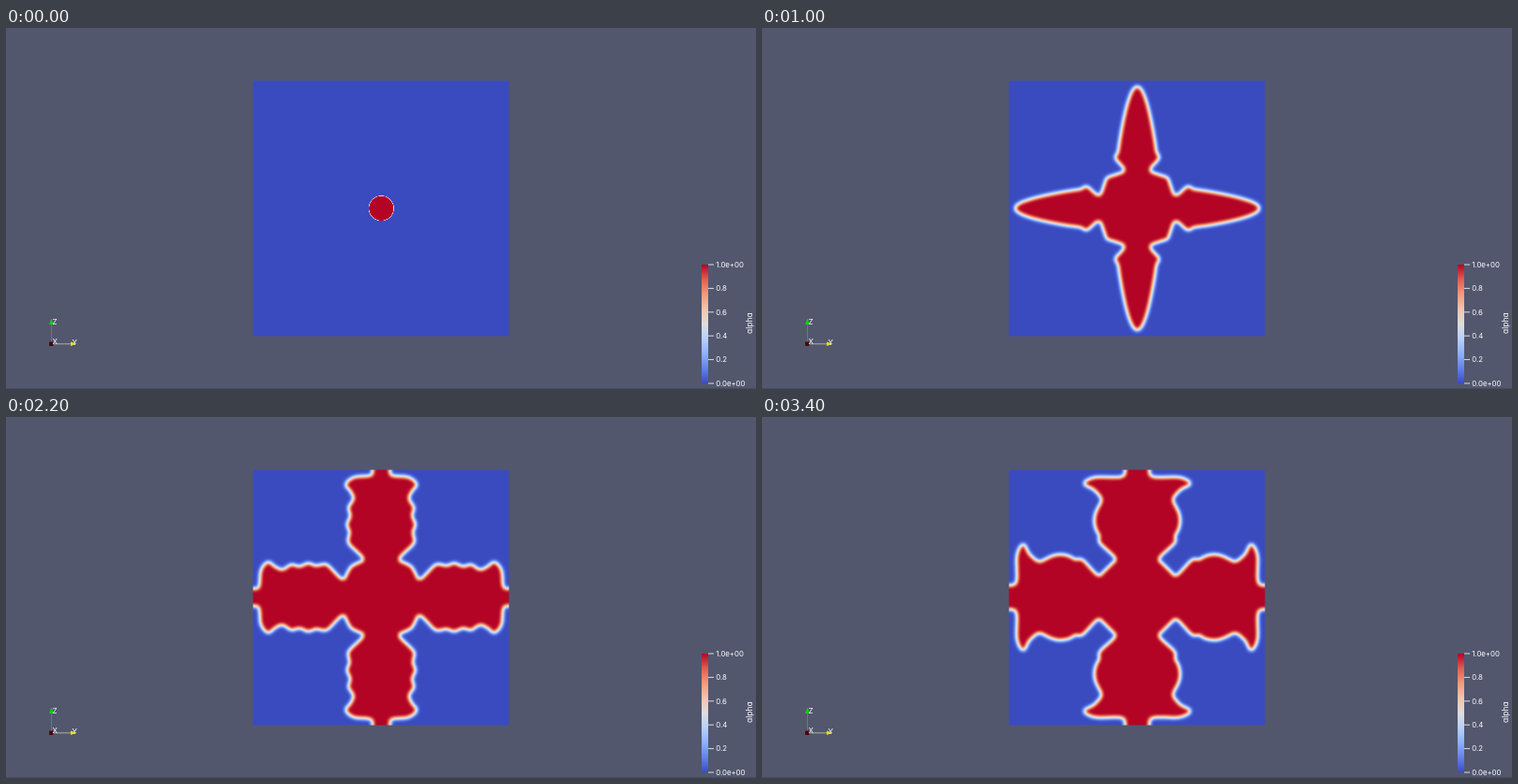
Recreate the animation shown at these times as an HTML page. Size 800 px wide and 386 px high, loop 3.6 s.

```html
<!DOCTYPE html>
<html lang="en">
<head>
<meta charset="utf-8">
<title>Crystal growth</title>
<style>
  html, body { margin: 0; width: 100%; height: 100%; overflow: hidden; background: #52576e; }
  svg { display: block; width: 100%; height: 100%; }
  text { font-family: Inter, "Open Sans", sans-serif; font-size: 8px; fill: #fff; font-feature-settings: "cv11"; }
</style>
</head>
<body>
<svg viewBox="0 0 800 386">
  <defs>
    <clipPath id="box"><rect x="263.5" y="56.5" width="273" height="273"/></clipPath>
    <linearGradient id="ramp" x1="0" y1="1" x2="0" y2="0"></linearGradient>
    <filter id="cool" filterUnits="userSpaceOnUse" x="250" y="43" width="300" height="300" color-interpolation-filters="sRGB">
      <feGaussianBlur id="blur" stdDeviation="2"/>
      <feComponentTransfer id="map"></feComponentTransfer>
    </filter>
  </defs>
  <rect width="800" height="386" fill="#52576e"/>
  <rect y="385" width="800" height="1" fill="#484c61"/>

  <g clip-path="url(#box)">
    <g filter="url(#cool)">
      <rect x="240" y="33" width="320" height="320" fill="#000"/>
      <path id="crystal" fill="#fff"/>
    </g>
  </g>

  <g id="axes">
    <path d="M48.5 337V317" stroke="#1fae2c"/>
    <path d="M49 337.8H70" stroke="#a9b58c"/>
    <path d="M48.5 310.5L51 317H46Z" fill="#10d010"/>
    <path d="M75.5 337.8L69 335.5V340Z" fill="#e8e010"/>
    <rect x="46" y="335.5" width="4.5" height="4.5" rx="1" fill="#4a0508"/>
    <text x="49.4" y="316.5">Z</text>
    <text x="49.6" y="338">X</text>
    <text x="70.4" y="338.5">Y</text>
  </g>

  <g id="legend">
    <rect x="742" y="253" width="7" height="127" fill="url(#ramp)"/>
    <text transform="translate(796 327) rotate(-90)" style="font-size:8.5px">alpha</text>
  </g>
</svg>
<script>
const NS = "http://www.w3.org/2000/svg";
const $ = id => document.getElementById(id);
function add(parent, tag, attrs, text) {
  const el = document.createElementNS(NS, tag);
  for (const k in attrs) el.setAttribute(k, attrs[k]);
  if (text) el.textContent = text;
  parent.appendChild(el);
}

// Cool to warm colour map, shared by the field and the legend.
const MAP = ["#3b4cc0", "#6282ea", "#8db0fe", "#b8d0f9", "#dddddd", "#f5c4ad", "#f49a7b", "#de604d", "#b40426"];
MAP.forEach((c, i) => add($("ramp"), "stop", { offset: i / 8, "stop-color": c }));
["R", "G", "B"].forEach((ch, i) => add($("map"), "feFunc" + ch, {
  type: "table",
  tableValues: MAP.map(c => (parseInt(c.substr(1 + 2 * i, 2), 16) / 255).toFixed(3)).join(" ")
}));

for (let i = 0; i <= 5; i++) {
  const y = 380 - i * 25.4;
  add($("legend"), "path", { d: `M749 ${y}H755`, stroke: "#fff", "stroke-width": 0.8 });
  const label = i % 5 ? (i / 5).toFixed(1) : i / 5 + ".0e+00";
  add($("legend"), "text", { x: 757.2, y: y + 2.8, style: "font-size:7.8px" }, label);
}

const STEP = 200, LOOP = 3600, CX = 400.3, CY = 192.8;
const BUD = 400, STAR = 1000, WALL = 1400, END = 3400;
const lerp = (a, b, k) => a + (b - a) * k;
const range = (n, f) => Array.from({ length: n }, (_, i) => f(i));

// Each outline is one eighth of the crystal: [half width, height] from arm tip to diagonal.
function seed() {
  return range(19, i => {
    const a = i / 18 * Math.PI / 4;
    return [13.3 * Math.sin(a), 13.3 * Math.cos(a)];
  });
}

// Free growth: a parabolic arm whose tip advances at constant speed.
function star(t) {
  const k = Math.max(0, (t - BUD) / (STAR - BUD));
  const size = 0.55 + 0.45 * Math.min(1, t / BUD);
  const at = (w0, h0, w1, h1) => [lerp(w0, w1, k) * size, lerp(h0, h1, k) * size];
  const tip = 13.3 + 0.1172 * t;
  const flank = at(9.2, 39, 20.8, 60);
  return [
    ...range(15, i => [flank[0] * i / 14, lerp(tip, flank[1], (i / 14) ** 2)]),
    at(9.6, 36.5, 23.5, 53.5),
    at(11, 33.5, 14, 41),
    at(17, 28.5, 25, 35.5),
    at(24, 24, 32.6, 32.6)
  ];
}

// After the arms meet the wall: they thicken, ripple and grow horns at the ends.
function cross(t) {
  const s = Math.max(0, (t - WALL) / (END - WALL)), u = s ** 0.78;
  const at = (w0, h0, w1, h1) => [lerp(w0, w1, u), lerp(h0, h1, u)];
  const side = h => lerp(24.5, 46, u) - 0.12 * (h - 83) * (1 - u) - 0.02 * (h - 82) ** 2 * s ** 2
    + 1.6 * Math.sin(Math.PI * s) * Math.cos((h - 78) / 18 * 2 * Math.PI);
  return [
    at(6, 150, 13, 150),
    at(6, 137, 13, 137),
    at(6.5, 132, 17, 129),
    at(14, 128.5, 45, 128.5),
    at(20, 120, 57, 121.5),
    at(20.5, 112, 46, 114.5),
    at(21.5, 106, 38.5, 105),
    ...range(8, i => { const h = 97 - 4.5 * i; return [side(h), h]; }),
    at(29.5, 56.5, 40, 58),
    at(15.5, 41, 24, 42.3),
    at(25, 36.5, 27, 36.5),
    at(33.5, 33.5, 31.7, 31.7)
  ];
}

function octant(t) {
  if (t === 0) return seed();
  if (t <= STAR) return star(t);
  const k = Math.min(1, (t - STAR) / (WALL - STAR)), from = star(STAR);
  return cross(t).map(([w, h], i) => [lerp(from[i][0], w, k), lerp(from[i][1], h, k)]);
}

function outline(t) {
  const o = octant(t), all = [];
  let quad = o.concat(o.slice(0, -1).reverse().map(([x, y]) => [y, x]));
  for (let q = 0; q < 4; q++) {
    all.push(...quad);
    quad = quad.map(([x, y]) => [y, -x]);
  }
  return all;
}

function smooth(pts) {
  const n = pts.length, at = i => pts[(i + n) % n];
  const xy = (x, y) => (CX + x).toFixed(2) + " " + (CY - y).toFixed(2);
  let d = "M" + xy(...pts[0]);
  for (let i = 0; i < n; i++) {
    const [a, b, c, e] = [at(i - 1), at(i), at(i + 1), at(i + 2)];
    d += "C" + xy(b[0] + (c[0] - a[0]) / 6, b[1] + (c[1] - a[1]) / 6)
      + " " + xy(c[0] - (e[0] - b[0]) / 6, c[1] - (e[1] - b[1]) / 6)
      + " " + xy(...c);
  }
  return d + "Z";
}

let shown = -1;
function draw(ms) {
  const t = Math.floor(ms % LOOP / STEP) * STEP;
  if (t === shown) return;
  shown = t;
  $("blur").setAttribute("stdDeviation", t ? 2 : 0.5);
  $("crystal").setAttribute("d", smooth(outline(t)));
}

const start = performance.now();
function tick() {
  draw(performance.now() - start);
  requestAnimationFrame(tick);
}
tick();
</script>
</body>
</html>
```
